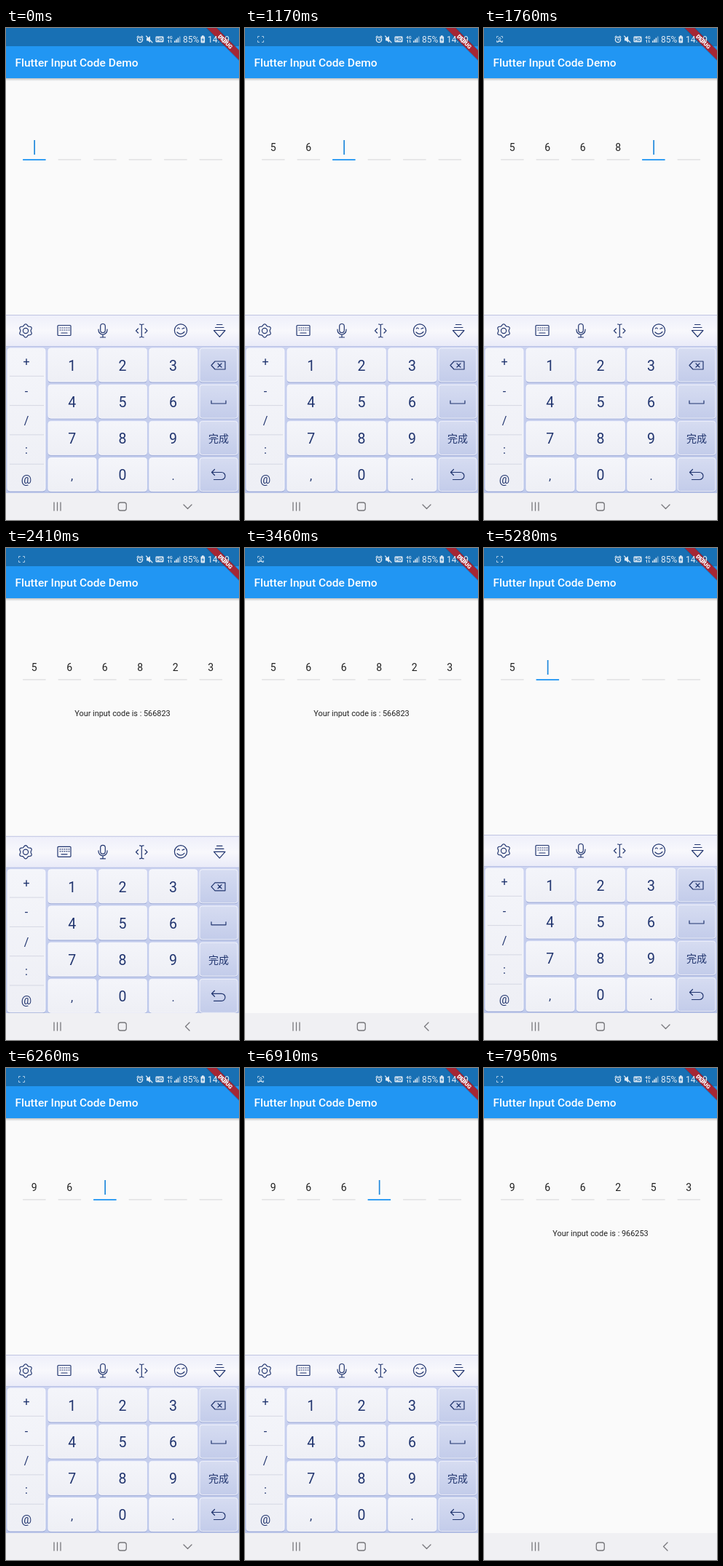
Write an HTML page that moves like this. It is 320 px wide and 676 px high and loops after 8 s.

```html
<!DOCTYPE html>
<html lang="en">
<head>
<meta charset="utf-8">
<title>Input code demo</title>
<style>
html, body { margin: 0; width: 100%; height: 100%; overflow: hidden; background: #fafafa; }
svg { display: block; width: 100%; height: 100%; }
text { font-family: Roboto, "Noto Sans CJK SC", "Noto Sans CJK", sans-serif; }
.mid { text-anchor: middle; }
.line { fill: none; stroke-linecap: round; stroke-linejoin: round; }
</style>
</head>
<body>
<svg id="stage" viewBox="0 0 320 676" preserveAspectRatio="none"></svg>
<script>
const LOOP = 8000, SLOTS = 6;
const INK = '#21356f';
const slotX = i => 38.8 + i * 48.5;

// [time, code]; the first entry is in the past so the caret is about to fade
const edits = [
  [-550, ''], [390, '5'], [650, '56'], [1240, '566'], [1500, '5668'],
  [1960, '56682'], [2280, '566823'],
  [4240, '56682'], [4430, '5668'], [4630, '566'], [4820, '56'], [5020, '5'],
  [5350, ''], [5930, '9'], [6260, '96'], [6580, '966'],
  [6960, '9662'], [7140, '96625'], [7300, '966253']
];

const rect = (x, y, w, h, fill, r = 0, more = '') =>
  `<rect x="${x}" y="${y}" width="${w}" height="${h}" rx="${r}" fill="${fill}" ${more}/>`;
const line = (d, color = INK, width = 1.2) =>
  `<path class="line" d="${d}" stroke="${color}" stroke-width="${width}"/>`;
const text = (s, x, y, size, fill, more = 'class="mid"') =>
  `<text x="${x}" y="${y}" font-size="${size}" fill="${fill}" ${more}>${s}</text>`;
const ring = (x, y, r, color = INK, width = 1.2) =>
  `<circle cx="${x}" cy="${y}" r="${r}" fill="none" stroke="${color}" stroke-width="${width}"/>`;
const fade = (id, ...stops) =>
  `<linearGradient id="${id}" x2="0" y2="1">${stops.map((c, i) =>
    `<stop offset="${i / (stops.length - 1)}" stop-color="${c}"/>`).join('')}</linearGradient>`;

function gear(x, y) {
  const pts = Array.from({ length: 48 }, (_, i) => {
    const a = i / 48 * 2 * Math.PI, r = 8.1 + 1.1 * Math.cos(6 * a);
    return `${(x + r * Math.sin(a)).toFixed(2)} ${(y - r * Math.cos(a)).toFixed(2)}`;
  });
  return line('M' + pts.join('L') + 'Z') + ring(x, y, 3.6);
}

function toolbar() {
  let dots = '';
  for (let r = 0; r < 2; r++)
    for (let c = 0; c < 5; c++) dots += `M${74 + c * 3} ${412 + r * 3}h1`;
  return rect(0, 394, 320, 44, 'url(#bar)') + rect(0, 394, 320, 1, '#c0c4e2') +
    gear(27, 416) +
    rect(71, 408.5, 18, 14, 'none', 1, `stroke="${INK}" stroke-width="1.2"`) +
    line(dots + 'M76 419h8') +
    rect(129.7, 406.5, 6.6, 12, 'none', 3.3, `stroke="${INK}" stroke-width="1.2"`) +
    line('M127 414v1a6 6 0 0 0 12 0v-1M133 421v4M129.5 425h7') +
    line('M186.3 408v16M183.5 407q2 0 2.8 1q.8-1 2.8-1M183.5 425q2 0 2.8-1q.8 1 2.8 1M181.5 413l-3 3l3 3M191 413l3 3l-3 3') +
    ring(240, 415.5, 8.6) +
    line('M235.3 413q1.5-2 3 0M242 413.3l3-1.2M235 418q5 5 10-.5') +
    line('M289.5 407.5h7.5M287.5 411.5h11.5M285.5 415.5h15.5l-7.7 8.8z');
}

function keys() {
  const rowY = r => 440 + r * 50.2;
  const key = (x, y, w, h, fill) =>
    rect(x, y + 1.4, w, h, '#9eabd6', 3.5) + rect(x, y, w, h, fill, 3.5, 'stroke="#fbfbff" stroke-width=".8"');
  let s = rect(0, 437, 320, 203, 'url(#panel)') + rect(0, 437, 320, 1, '#b9c2e6');
  s += key(2, 440, 52, 196, 'url(#key)');
  ['+', '-', '/', ':', '@'].forEach((c, i) => {
    s += text(c, 28, 464.3 + i * 40.3, 16, INK);
    if (i) s += rect(5, 437.5 + i * 40.3, 47, 1, '#d5d7e3');
  });
  ['123', '456', '789', ',0.'].forEach((row, r) => {
    [...row].forEach((c, i) => {
      s += key(58 + i * 69.4, rowY(r), 66, 46, 'url(#key)');
      s += text(c, 90.7 + i * 69.4, 470.8 + r * 50.1, /\d/.test(c) ? 19.5 : 16, INK);
    });
    s += key(266, rowY(r), 52, 46, 'url(#side)');
  });
  return s +
    line('M282 463.5l5-5.5h14v11h-14zM291 461l5 5M296 461l-5 5') +
    line('M282 512v4h20v-4') +
    text('完成', 292, 569, 14, INK) +
    line('M286.5 606.5l-4 4l4 4M282.5 610.5h13.5a5 5 0 0 1 0 10h-10.5');
}

function statusBar() {
  const W = '#dfeaf4';
  return ring(184, 16, 3.6, W, 1.3) + line('M184 14v2.2h1.8M180 12.6l1.8-1.6M188 12.6l-1.8-1.6', W, 1.1) +
    `<path d="M193 13.7h2l3-2.6v9l-3-2.6h-2z" fill="${W}"/>` + line('M192.5 11l8.5 9', W, 1.1) +
    rect(205.5, 11.5, 11, 8, W, 1.2) +
    text('HD', 211, 18, 6.5, '#1870b4', 'class="mid" font-weight="700"') +
    text('4G', 225, 15, 5.8, W, 'class="mid" font-weight="700"') +
    line('M223.5 20v-3.5l-1 1M226.5 16.5v3.5l1-1', W, .9) +
    [0, 1, 2, 3].map(i => rect(231 + i * 2.3, 17.5 - i * 2, 1.5, 2.5 + i * 2, W, 0, i > 2 ? 'opacity=".5"' : '')).join('') +
    text('85%', 243, 19.7, 12, W, '') +
    rect(267.5, 11.5, 5.6, 9, W, 1) + rect(269, 10.3, 2.6, 2, W) +
    `<path d="M271 12.8l-2.4 3.6h1.6l-.5 3l2.3-3.8h-1.6z" fill="#1870b4"/>` +
    text('14:19', 277, 19.7, 12, W, '');
}

function banner() {
  return `<g transform="translate(320 0) rotate(45)">` +
    rect(-40, 21, 80, 11, '#000', 0, 'opacity=".18"') +
    rect(-40, 21.8, 80, 9.4, '#a52634') +
    text('DEBUG', 0, 29.2, 7.6, '#fff', 'class="mid" font-weight="900"') + '</g>';
}

const slots = Array.from({ length: SLOTS }, (_, i) =>
  `<rect class="under" x="${slotX(i) - 15.7}" width="31.5"/>` +
  text('', slotX(i), 168.8, 14, '#212121', 'class="mid digit"')).join('');

document.getElementById('stage').innerHTML =
  '<defs>' +
  fade('bar', '#eeeffa', '#f8f8fc', '#e9eaf8') + fade('panel', '#ccd3f0', '#bdc8ea') +
  fade('key', '#f4f5fa', '#eeeff5') + fade('side', '#d6dcf1', '#c3ccea') +
  fade('shade', '#00000038', '#00000000') + '</defs>' +
  rect(0, 0, 320, 676, '#fafafa') +
  rect(0, 69, 320, 4, 'url(#shade)') +
  rect(0, 25, 320, 44, '#2196f3') + rect(0, 0, 320, 25, '#1870b4') +
  text('Flutter Input Code Demo', 12.5, 53, 15.5, '#fff', 'font-weight="500"') +
  slots + rect(0, 154, 1.7, 20, '#2189dc', 0, 'id="caret"') +
  text('', 160, 231, 10.9, '#212121', 'class="mid" id="result"') +
  `<g id="keyboard">${toolbar()}${keys()}</g>` +
  rect(0, 639, 320, 37, '#f0f0f3') +
  line('M66 652v11M70.5 652v11M75 652v11', '#77777b', 1.3) +
  rect(154.3, 652, 11, 11, 'none', 3, 'stroke="#77777b" stroke-width="1.3"') +
  `<path id="back" class="line" stroke="#77777b" stroke-width="1.3"/>` +
  banner() + statusBar() +
  `<g id="rec">${line('M17.5 13.5v-2h2M23.5 11.5h2v2M25.5 17.5v2h-2M19.5 19.5h-2v-2', '#a9cbe6', 1)}` +
  `<g id="recFull">${ring(21.5, 14.6, 1.5, '#c2dbee', 1)}${line('M18.9 18.2q2.6-2.6 5.2 0z', '#c2dbee', 1)}</g></g>`;

const $ = id => document.getElementById(id);
const unders = document.querySelectorAll('.under');
const digits = document.querySelectorAll('.digit');
const clamp = v => Math.max(0, Math.min(1, v));
const show = (el, on) => el.setAttribute('visibility', on ? 'visible' : 'hidden');

// 0 = keyboard fully up, 1 = hidden
function hidden(t) {
  if (t < 3470) return clamp((t - 2380) / 160) ** 3;
  if (t < 7000) return (1 - clamp((t - 3470) / 430)) ** 3;
  return clamp((t - 7340) / 160) ** 3;
}

function caretOpacity(age) {
  const p = age % 1100;
  return p < 550 ? 1 : p < 750 ? 1 - (p - 550) / 200 : p < 900 ? 0 : (p - 900) / 200;
}

function render(t) {
  let [since, code] = edits[0];
  for (const [at, value] of edits) if (t >= at) [since, code] = [at, value];
  const n = code.length, full = n === SLOTS;

  digits.forEach((d, i) => d.textContent = code[i] || '');
  unders.forEach((u, i) => {
    const on = i === n;
    u.setAttribute('y', on ? 180.1 : 180.2);
    u.setAttribute('height', on ? 1.8 : 1.3);
    u.setAttribute('fill', on ? '#2196f3' : '#dedee0');
  });
  $('caret').setAttribute('x', slotX(Math.min(n, SLOTS - 1)) - .5);
  $('caret').setAttribute('opacity', full ? 0 : caretOpacity(t - since));
  $('result').textContent = full ? 'Your input code is : ' + code : '';

  $('keyboard').setAttribute('transform', `translate(0 ${(hidden(t) * 246).toFixed(2)})`);
  const closed = (t >= 2380 && t < 3470) || t >= 7340;
  $('back').setAttribute('d', closed ? 'M252 652l-5.5 5.5l5.5 5.5' : 'M244 655l5.5 5.5l5.5-5.5');

  const beat = Math.floor((t - 418) / 502);
  show($('rec'), beat >= 0);
  show($('recFull'), beat >= 0 && beat % 2 === 0);
}

const start = performance.now();
function tick(now) {
  render(Math.max(0, now - start) % LOOP);
  requestAnimationFrame(tick);
}
render(0);
requestAnimationFrame(tick);
</script>
</body>
</html>
```
